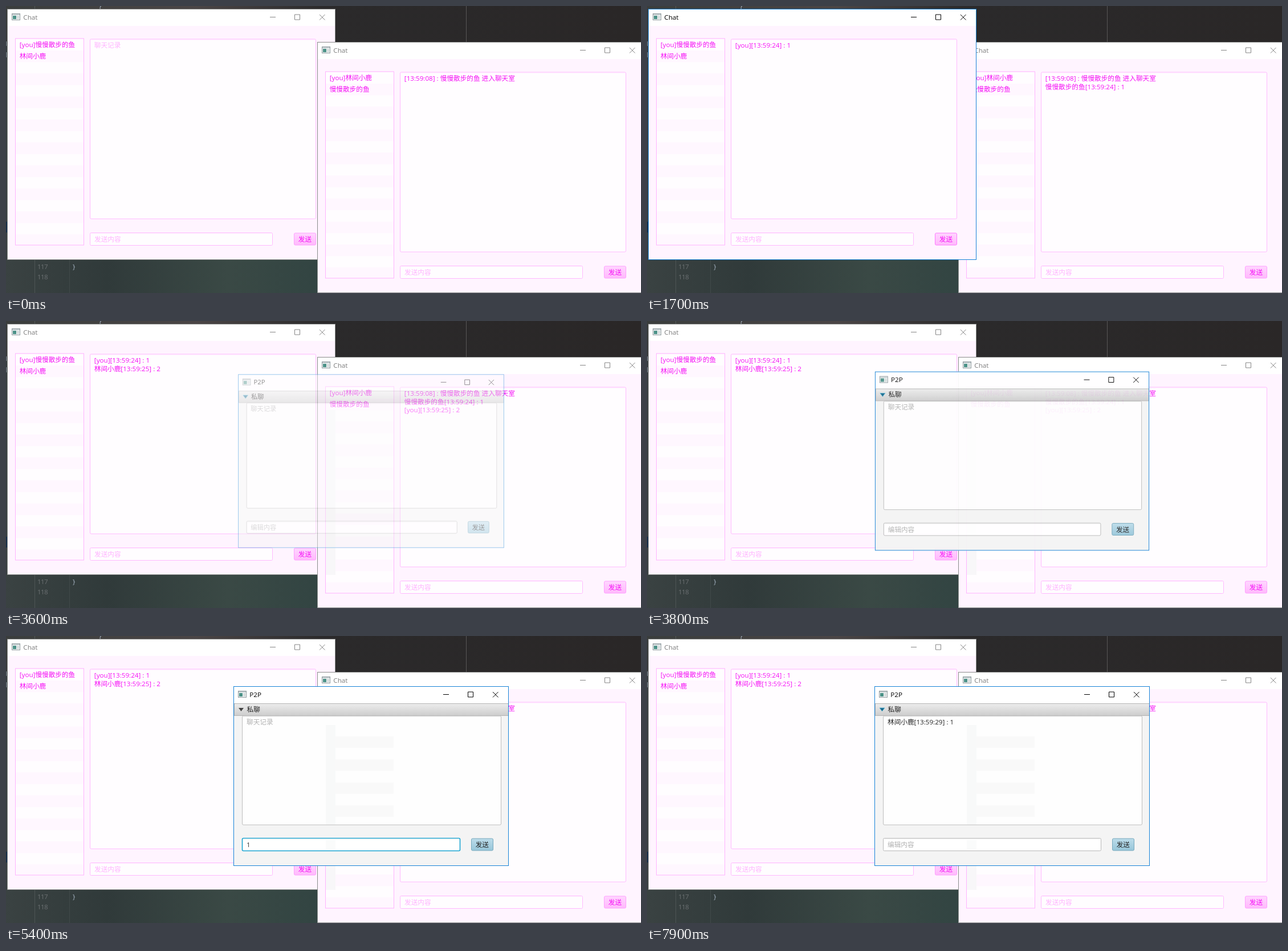
Recreate the animation shown at these times as an HTML page. Size 1114 px wide and 503 px high, loop 8 s.

```html
<!DOCTYPE html>
<html lang="zh">
<head>
<meta charset="utf-8">
<title>Chat</title>
<style>
html, body { margin: 0; width: 100%; height: 100%; overflow: hidden; background: #2b2b2b; }
svg { display: block; width: 1114px; height: 503px; }
text { font: 11.65px "Open Sans", "Noto Sans CJK SC", "Noto Sans CJK", sans-serif; white-space: pre; }
</style>
</head>
<body>
<svg id="stage" viewBox="0 0 1114 503" xmlns="http://www.w3.org/2000/svg">
  <defs>
    <linearGradient id="desk">
      <stop offset="0" stop-color="#3a4242"/><stop offset=".16" stop-color="#303a3a"/>
      <stop offset=".35" stop-color="#3a4945"/><stop offset=".6" stop-color="#2c4140"/>
      <stop offset="1" stop-color="#1f3132"/>
    </linearGradient>
    <linearGradient id="top">
      <stop offset="0" stop-color="#3a3d3c"/><stop offset=".3" stop-color="#4a4545"/>
      <stop offset=".5" stop-color="#2b2a2b"/><stop offset="1" stop-color="#2a2727"/>
    </linearGradient>
    <linearGradient id="pink" x2="0" y2="1">
      <stop offset="0" stop-color="#ffd6ff"/><stop offset="1" stop-color="#ffb9fc"/>
    </linearGradient>
    <linearGradient id="pinkHover" x2="0" y2="1">
      <stop offset="0" stop-color="#ffe4ff"/><stop offset="1" stop-color="#ffcdff"/>
    </linearGradient>
    <linearGradient id="blue" x2="0" y2="1">
      <stop offset="0" stop-color="#bcdcea"/><stop offset="1" stop-color="#97c6d9"/>
    </linearGradient>
    <linearGradient id="blueHover" x2="0" y2="1">
      <stop offset="0" stop-color="#cfe8f2"/><stop offset="1" stop-color="#acd6e6"/>
    </linearGradient>
    <linearGradient id="bar" x2="0" y2="1">
      <stop offset="0" stop-color="#ececec"/><stop offset="1" stop-color="#cdcdcd"/>
    </linearGradient>
    <linearGradient id="barHover" x2="0" y2="1">
      <stop offset="0" stop-color="#f7f7f7"/><stop offset="1" stop-color="#dcdcdc"/>
    </linearGradient>
  </defs>
  <g id="scene"></g>
</svg>
<script>
const LOOP = 8000, STEP = 100;
const ANNA = '慢慢散步的鱼', BELL = '林间小鹿';
const MAGENTA = '#f510f5', PROMPT = '#ffb2ff', ACTIVE = '#1883d7';
const scene = document.getElementById('scene');

const rect = (x, y, w, h, fill, extra = '') =>
  `<rect x="${x}" y="${y}" width="${w}" height="${h}" fill="${fill}" ${extra}/>`;
const box = (x, y, w, h, fill, stroke, r = 2, sw = 1) =>
  rect(x + .5, y + .5, w, h, fill, `rx="${r}" stroke="${stroke}" stroke-width="${sw}"`);
const text = (x, y, s, fill) => `<text x="${x}" y="${y}" fill="${fill}">${s}</text>`;
const path = (d, stroke) => `<path d="${d}" fill="none" stroke="${stroke}"/>`;
const group = (attrs, body) => `<g ${attrs}>${body}</g>`;

function desktop() {
  return rect(0, 0, 1114, 503, 'url(#desk)') + rect(0, 0, 1114, 66, 'url(#top)') +
    rect(807, 0, 1, 64, '#585656') +
    rect(0, 378, 3, 19, '#17304a') + rect(0, 62, 1, 8, '#8795a0') + rect(0, 81, 1, 9, '#8795a0') +
    rect(50, 0, 1, 6, '#525858') + rect(50, 444, 1, 59, '#4d5555') + rect(111, 444, 1, 59, '#414a4a') +
    text(163, 4, '}', '#a9b7c6') + text(117, 461, '}', '#a9b7c6') +
    group('style="letter-spacing:-.6px"', text(55, 461, '117', '#6b7072') + text(55, 479, '118', '#6b7072'));
}

// Window title with icon and the three caption buttons; x, y is the frame corner.
function caption(x, y, w, title, active) {
  const ink = active ? '#000' : '#858585', r = x + w, m = y + 14.5;
  return rect(x, y, w, 30, '#fff') +
    box(x + 8, y + 8, 14, 11, '#f4f6f6', '#8e999d', 0) +
    rect(x + 9, y + 9, 13, 2, '#c3cccf') + rect(x + 10, y + 12, 6, 6, '#4b9187') +
    rect(x + 17, y + 12, 4, 6, '#d5dcdd') +
    text(x + 28.3, y + 18.6, title, active ? '#000' : '#7d7d7d') +
    path(`M${r - 114} ${m}h10`, ink) +
    path(`M${r - 70.5} ${m - 4.5}h9v9h-9z`, ink) +
    path(`M${r - 27} ${m - 4.5}l9.5 9.5m0 -9.5l-9.5 9.5`, ink);
}

const border = (x, y, w, h, active) =>
  rect(x + .5, y + .5, w, h, 'none', `stroke="${active ? ACTIVE : '#8a8c8b'}"`);

function field(x, y, w, s, look) {
  const edge = s.focus ? look.focus : look.edge;
  return box(x, y, w, 22, look.fill, edge, 2, s.focus ? 1.6 : 1) +
    rect(x + 2, y + 1.5, w - 3, 1, look.shade) +
    (s.focus || s.typed ? text(x + 8, y + 16, s.typed, look.ink) : text(x + 8, y + 16, look.prompt, look.promptInk)) +
    (s.caret ? rect(x + 8 + (s.typed ? 7 : 0), y + 4, 1, 15, look.ink) : '');
}

const PINK = { fill: '#fffdff', edge: '#ffbaff', focus: '#ff5cff', shade: '#fff0ff',
  ink: MAGENTA, prompt: '发送内容', promptInk: PROMPT };
const GREY = { fill: '#fff', edge: '#b9b9b9', focus: '#1ba5d2', shade: '#f0f0f0',
  ink: '#333', prompt: '编辑内容', promptInk: '#b0b0b0' };

function chat(dx, dy, names, lines, s) {
  let out = rect(2, 5, 576, 440, '#fff4ff') + caption(2, 5, 575, 'Chat', s.active);
  for (let i = 0; i < 18; i++)
    out += rect(17, 58 + i * 20.15, 119, Math.min(20.15, 419 - 58 - i * 20.15), i % 2 ? '#fff7ff' : '#fffdff');
  if (s.ghost) out += rect(17, 98, 17, 289, '#f8f7f9');
  out += box(16, 56.5, 120, 362, 'none', '#ffb4ff', 0);
  names.forEach((n, i) => out += text(23.7, 72.3 + i * 19.8, n, MAGENTA));
  out += box(147, 57.5, 396, 315, '#fffdff', '#ffbaff') + rect(149, 59, 393, 1, '#fff0ff');
  if (lines.length) lines.forEach((l, i) => out += text(154.8, 73.2 + i * 14.4, l, MAGENTA));
  else out += text(154.8, 72.8, '聊天记录', PROMPT);
  out += field(147, 397, 320, s, PINK) +
    box(505, 397.5, 38, 21, s.hover ? 'url(#pinkHover)' : 'url(#pink)', s.sent ? '#ff78ff' : '#ff9fff') +
    text(512.8, 413, '发送', MAGENTA) + border(2, 5, 575, 439, s.active);
  return group(`transform="translate(${dx} ${dy})"`, out);
}

function privateChat(s) {
  let out = rect(399, 88, 483, 315, '#f4f4f4') + caption(399, 88, 482, 'P2P', s.active) +
    box(400, 118, 481, 21, s.barHover ? 'url(#barHover)' : 'url(#bar)', '#b4b4b4', 0) +
    `<path d="M408 126h9l-4.5 6z" fill="${s.arrow ? '#17678a' : '#444'}" ${s.arrow ? 'stroke="#58b5d3" stroke-width=".8"' : ''}/>` +
    text(422.6, 133, '私聊', '#222') +
    box(414, 139.5, 454, 191, '#fefefe', '#bdbdbd') + rect(416, 141, 451, 1, '#f1f1f1');
  if (s.ghost) {
    out += rect(561, 156, 17, 174, '#f8f9f9');
    for (let i = 0; i < 4; i++) out += rect(578, 176 + i * 40.3, 102, 20, '#f9f9f9');
  }
  out += s.line ? text(422, 155.2, s.line, '#222') : text(422, 154.8, GREY.prompt && '聊天记录', '#b0b0b0');
  out += field(414, 354, 382, s, GREY);
  if (s.ghost) out += rect(561, 358, 17, 16, '#fafbfb');
  out += box(816, 354.5, 38, 21, s.hover ? 'url(#blueHover)' : 'url(#blue)', '#78a9bd') +
    text(823.7, 370, '发送', '#222') + border(399, 88, 482, 314, s.active);
  const k = s.scale;
  return group(`opacity="${s.opacity}" transform="translate(640.5 245.5) scale(${k}) translate(-640.5 -245.5)"`, out);
}

function draw(t) {
  const during = (a, b) => t >= a && t < b;
  const leftLines = [], rightLines = [`[13:59:08] : ${ANNA} 进入聊天室`];
  if (t >= 1700) {
    leftLines.push('[you][13:59:24] : 1');
    rightLines.push(`${ANNA}[13:59:24] : 1`);
  }
  if (t >= 2800) {
    leftLines.push(`${BELL}[13:59:25] : 2`);
    rightLines.push('[you][13:59:25] : 2');
  }
  const left = chat(0, 0, ['[you]' + ANNA, BELL], leftLines, {
    active: during(700, 2000), focus: during(700, 1600), caret: during(700, 1600),
    typed: during(1200, 1700) ? '1' : '', hover: during(1400, 1600), sent: during(1600, 2000)
  });
  const right = chat(544, 58, ['[you]' + BELL, ANNA], rightLines, {
    active: during(2000, 3500), focus: during(2000, 2700), caret: during(2000, 2700),
    typed: during(2300, 2800) ? '2' : '', hover: during(2600, 2700), sent: during(2700, 3500),
    ghost: t >= 2000
  });
  let out = desktop() + (during(700, 2000) ? right + left : left + right);
  if (t >= 3600) {
    const p = Math.min(1, (t - 3500) / 400), ease = 1 - (1 - p) ** 2;
    out += privateChat({
      active: !during(6600, 7900), opacity: ease, scale: 1 - .06 * (1 - ease),
      barHover: during(4100, 4200), arrow: t < 4700 || t >= 7900, ghost: t >= 3900,
      focus: during(4700, 5800), caret: during(4700, 5400),
      typed: during(4900, 5900) ? '1' : '', hover: during(5500, 5800),
      line: t >= 7900 ? `${BELL}[13:59:29] : 1` : t >= 5900 ? '[you][13:59:29] : 1' : ''
    });
  }
  scene.innerHTML = out;
}

const start = performance.now();
let last = -1;
function tick() {
  const t = Math.floor((performance.now() - start) % LOOP / STEP) * STEP;
  if (t !== last) draw(last = t);
  requestAnimationFrame(tick);
}
tick();
</script>
</body>
</html>
```
